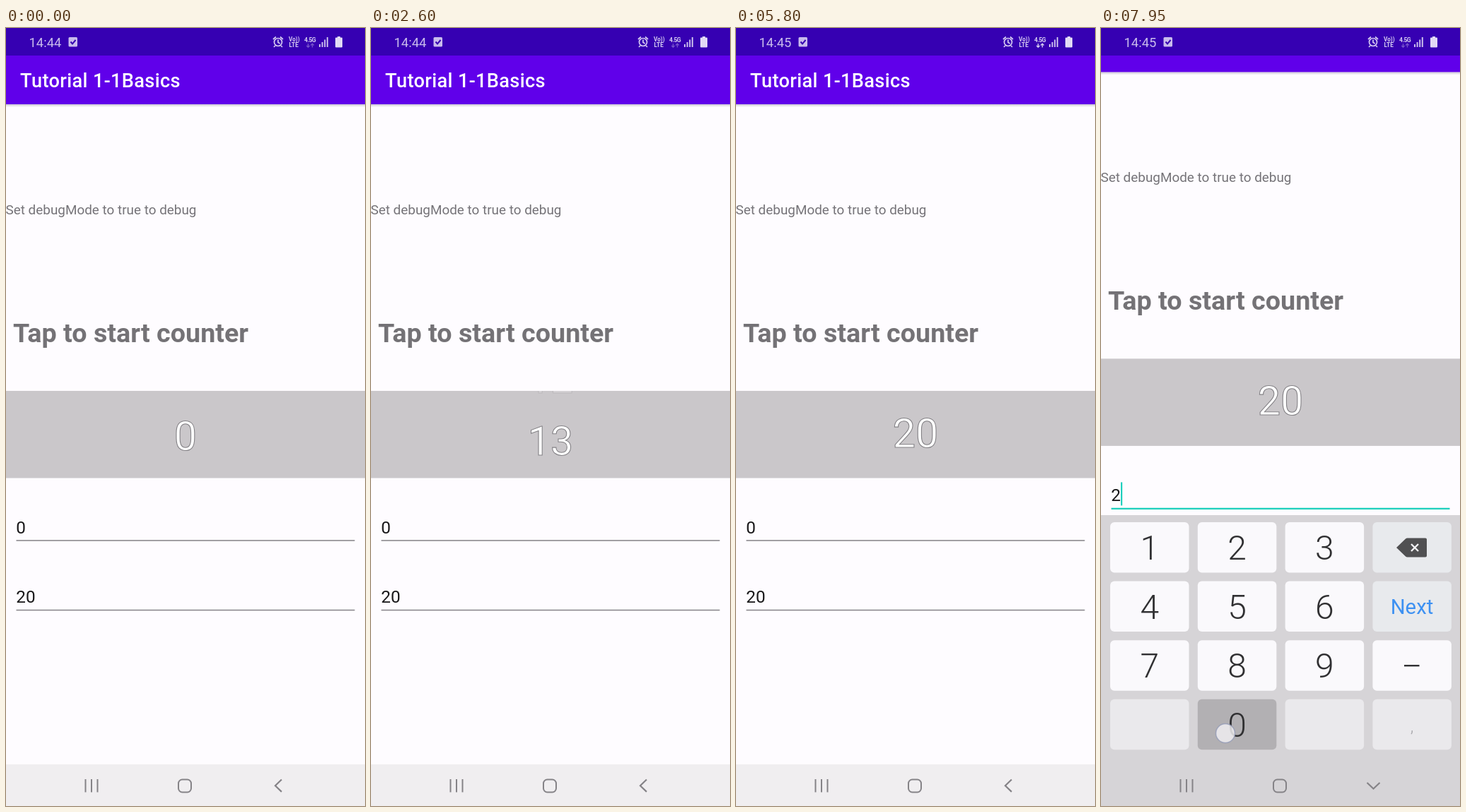
An HTML page for the animation above (8 s loop, 508 px wide and 1102 px high).

```html
<!DOCTYPE html>
<html lang="en">
<head>
<meta charset="utf-8">
<title>Counter tutorial</title>
<style>
html, body { margin: 0; width: 100%; height: 100%; overflow: hidden; background: #fefcff; }
svg { display: block; font-family: Roboto, sans-serif; }
.line { fill: none; stroke: #858387; stroke-width: 2; }
.count { font-size: 57.5px; text-anchor: middle; fill: #fff; stroke: #838185; stroke-width: 1.1; }
.field { font-size: 24.3px; fill: #19181a; }
.digit { font-size: 48px; font-weight: 300; text-anchor: middle; fill: #303032; }
</style>
</head>
<body>
<svg width="508" height="1102" viewBox="0 0 508 1102">
  <defs>
    <clipPath id="band"><rect y="514" width="508" height="123.5"/></clipPath>
    <linearGradient id="shade" x2="0" y2="1">
      <stop stop-color="#cbc6d4"/><stop offset="1" stop-color="#fefcff"/>
    </linearGradient>
  </defs>
  <rect width="508" height="1102" fill="#fefcff"/>

  <g id="app">
    <rect y="108" width="508" height="4" fill="url(#shade)"/>
    <rect y="30" width="508" height="78" fill="#6000ea"/>
    <text x="20" y="84" font-size="27.2" font-weight="500" letter-spacing=".34" fill="#fff">Tutorial 1-1Basics</text>
    <text x="-.5" y="263.5" font-size="18.9" fill="#757378">Set debugMode to true to debug</text>
    <text x="10" y="445" font-size="37.7" font-weight="700" fill="#747276">Tap to start counter</text>
    <rect y="514" width="508" height="123.5" fill="#cac7ca"/>
    <g clip-path="url(#band)">
      <text id="above" class="count" x="254"/>
      <text id="below" class="count" x="254"/>
    </g>
    <text id="from" class="field" x="14.3" y="715.5"></text>
    <rect id="rule" x="14.5" width="479"/>
    <rect id="caret" y="689" width="2.2" height="33" fill="#1fcfbd"/>
    <text class="field" x="14.3" y="814">20</text>
    <rect x="14.5" y="823.8" width="479" height="1.5" fill="#848287"/>
  </g>

  <rect width="508" height="39" fill="#3600b2"/>
  <g fill="#c9bcec">
    <text id="clock" x="32.5" y="27" font-size="18.4"></text>
    <rect x="88.5" y="13" width="12.5" height="13.5" rx="1.5"/>
    <path d="M91.5 19.5l2.5 3 4.5-5.5" fill="none" stroke="#3600b2" stroke-width="2"/>
    <g fill="none" stroke="#d6ccf1" stroke-width="1.7">
      <circle cx="385" cy="20" r="5.5"/>
      <path d="M385 16.5v4l2.8 1.6M378 16l4-3.5M392 16l-4-3.5M381 25l-2 2M389 25l2 2"/>
    </g>
    <g font-weight="700" fill="#d6ccf1">
      <text x="400" y="18.5" font-size="8.2">Vo))</text>
      <text x="400.5" y="27" font-size="8.2">LTE</text>
      <text x="422" y="19.5" font-size="8.6" letter-spacing="-.5">4.5G</text>
    </g>
    <path id="data" d="M427.5 22v5m-2.2-2l2.2 2.2 2.2-2.2M433.5 27.5v-5m-2.2 2l2.2-2.2 2.2 2.2" fill="none" stroke="#d6ccf1" stroke-width="1.4"/>
    <path d="M443 23h2v4h-2zM446.6 20h2v7h-2zM450.2 16.5h2v10.500h-2zM453.800 13h2v14h-2z"/>
    <path d="M469 12h4v1.500h2q1 0 1 1v12q0 1-1 1h-8q-1 0-1-1v-12q0-1 1-1h2z" fill="#e2daf5"/>
  </g>

  <rect y="1043" width="508" height="59" fill="#f0eef0"/>
  <g id="keyboard">
    <rect y="690" width="508" height="540" fill="#d6d4d7"/>
    <g id="keys"></g>
    <path d="M418 736l13-12.500q1-1 2.500-1h25.500q2 0 2 2v23q0 2-2 2h-25.500q-1.500 0-2.500-1z" fill="#505052"/>
    <path d="M439 731l10 10m0-10l-10 10" stroke="#f4f4f6" stroke-width="2.4"/>
    <text x="440" y="830" font-size="29.3" text-anchor="middle" fill="#3d91f2">Next</text>
    <rect x="429" y="902" width="21.500" height="2.400" fill="#303032"/>
    <text x="440" y="997" font-size="24" font-weight="300" text-anchor="middle" fill="#a5a4a9">,</text>
  </g>
  <g class="line">
    <path d="M112.500 1064v18.500M121 1064v18.500M129.500 1064v18.500"/>
    <rect x="244" y="1064.500" width="18" height="18" rx="5.500"/>
    <path id="back" stroke-width="2.200"/>
  </g>
  <circle id="touch" r="13.500" fill="#eeedf0" fill-opacity=".85" stroke="#8f97b4" stroke-opacity=".75" stroke-width="1.500"/>
</svg>
<script>
const $ = id => document.getElementById(id);
const set = (el, attrs) => { for (const k in attrs) el.setAttribute(k, attrs[k]); };
const show = (el, on) => set(el, { visibility: on ? 'visible' : 'hidden' });
const clamp = v => Math.max(0, Math.min(1, v));

const LOOP = 8000, FOCUS = 5900, ERASE = 7050, TYPED = 7500;
const ROW = 88, BASE = 594;
const labels = [...'123<456>789- 0 ,'];

// Each tap: start, end, position and the key it presses
const taps = [
  [1000, 1100, 250, 432],
  [5850, 5950, 250, 705],
  [7000, 7100, 440, 740, '<'],
  [7400, 7500, 193, 742, '2'],
  [7850, 8000, 176, 999, '0']
];

function add(tag, attrs, text = '') {
  const el = document.createElementNS('http://www.w3.org/2000/svg', tag);
  set(el, attrs);
  el.textContent = text;
  return $('keys').appendChild(el);
}

const keys = labels.map((label, i) => {
  const x = 13 + i % 4 * 123.8, y = 700 + (i >> 2) * 83.6;
  const fill = '<>'.includes(label) ? '#e8eaed' : ' ,'.includes(label) ? '#eae9ec' : '#faf9fc';
  const box = add('rect', { x, y, width: 111.500, height: 71.500, rx: 6, fill });
  if (/\d/.test(label)) add('text', { x: x + 55.7, y: y + 53, class: 'digit' }, label);
  return { label, fill, box };
});

function drawNumber(el, n, pos) {
  const d = n - pos;
  el.textContent = n;
  set(el, { y: BASE + d * ROW, opacity: d < 0 ? clamp(1.5 * (1 + d)) : 1 });
  show(el, n >= 0 && n <= 20);
}

function draw(t) {
  const pos = Math.max(-.045, Math.min(20, 1.727 + (t - 1300) * .008575));
  const n = Math.ceil(pos);
  drawNumber($('above'), n - 1, pos);
  drawNumber($('below'), n, pos);

  const u = clamp((t - 6050) / 330);
  set($('app'), { transform: `translate(0 ${-45.6 * (1 - (1 - u) ** 5)})` });
  set($('keyboard'), { transform: `translate(0 ${106 * (1 - u) ** 2})`, opacity: clamp(u * 1.4) });
  set($('back'), { d: u > 0 ? 'M376.500 1069l9 8.500 9-8.500' : 'M390 1064.500l-9 8.700 9 8.700' });

  const focused = t >= FOCUS;
  const value = t < ERASE ? '0' : t < TYPED ? '' : '2';
  const since = t - (t < ERASE ? FOCUS : t < TYPED ? ERASE : TYPED);
  $('from').textContent = value;
  set($('rule'), focused ? { y: 725.300, height: 2.300, fill: '#1fcfbd' } : { y: 725.200, height: 1.500, fill: '#848287' });
  set($('caret'), { x: value ? 28 : 14.500 });
  show($('caret'), focused && since % 1000 < 500);

  $('clock').textContent = t < 4400 ? '14:44' : '14:45';
  set($('data'), { opacity: t >= 5200 && t < 6800 ? 1 : .4 });

  const tap = taps.find(([start, end]) => t >= start && t < end);
  show($('touch'), tap);
  if (tap) set($('touch'), { cx: tap[2], cy: tap[3] });
  for (const { label, fill, box } of keys)
    set(box, { fill: tap && tap[4] === label ? '#b2b0b3' : fill });
}

function tick() {
  const t = performance.now() % LOOP;
  draw(Math.floor(t / 50) * 50);
  requestAnimationFrame(tick);
}
tick();
</script>
</body>
</html>
```
